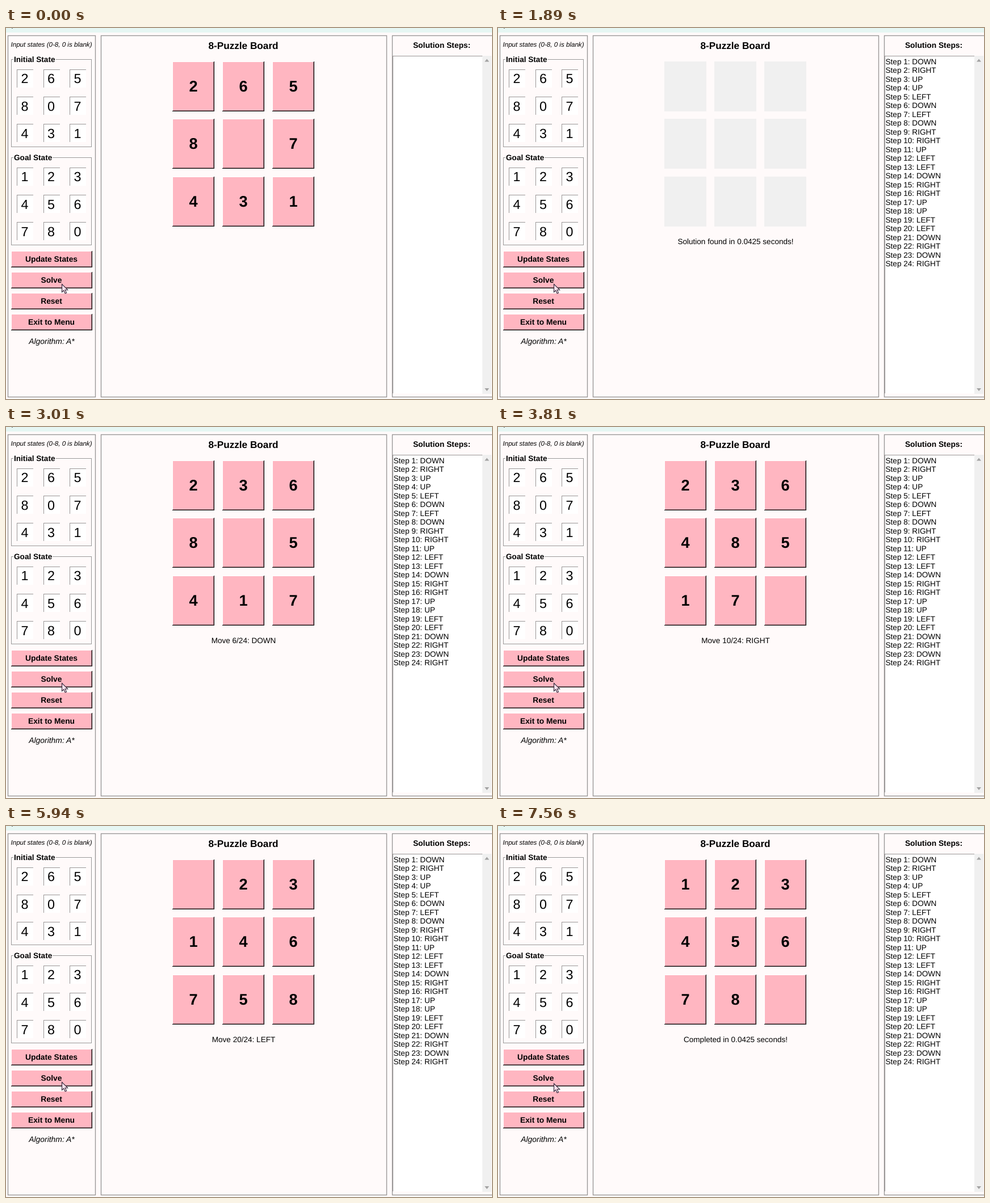
An HTML page with a canvas for the animation above (9870 ms loop, 856x654 px).

```html
<!DOCTYPE html>
<html lang="en">
<head>
<meta charset="utf-8">
<title>8-Puzzle Board</title>
<style>
  html, body { margin: 0; width: 100%; height: 100%; overflow: hidden; background: #fffafa; }
  canvas { display: block; }
</style>
</head>
<body>
<canvas id="stage" width="856" height="654"></canvas>
<script>
const ctx = document.getElementById('stage').getContext('2d');
const FAMILY = '"Liberation Sans", Arial, sans-serif';
const LOOP = 9870;
const SNOW = '#fffafa', PINK = '#ffb6c1', FACE = '#f0f0f0', GREY = '#999696';

const PRESS = 590, RELEASE = 790, SOLVED = 890, CLEARED = 1890, DONE = 7060, CURSOR_MOVED = 7560;
const MOVE_TIMES = [
  1990, 2190, 2390, 2600, 2800, 3010, 3210, 3410, 3610, 3810, 4020, 4220,
  4430, 4730, 4930, 5130, 5330, 5540, 5740, 5940, 6140, 6340, 6540, 6750
];
const MOVES = [...'DRUULDLDRRULLDRRUULLDRDR'];
const NAMES = { D: 'DOWN', R: 'RIGHT', U: 'UP', L: 'LEFT' };
const SHIFT = { D: 3, R: 1, U: -3, L: -1 };
const START = '265807431', GOAL = '123456780';

// Fractional letter advances keep the text widths true to the font size.
ctx.textRendering = 'geometricPrecision';

// Board after every move, beginning with the start state.
const boards = [[...START]];
for (const move of MOVES) {
  const next = [...boards[boards.length - 1]];
  const blank = next.indexOf('0');
  const other = blank + SHIFT[move];
  [next[blank], next[other]] = [next[other], next[blank]];
  boards.push(next);
}

function box(x, y, w, h, color) {
  ctx.fillStyle = color;
  ctx.fillRect(x, y, w, h);
}

function text(str, x, y, size, style = '', align = 'center') {
  ctx.font = `${style} ${size}px ${FAMILY}`;
  ctx.textAlign = align;
  ctx.fillStyle = '#000';
  ctx.fillText(str, x, y);
}

function outline(x, y, w, h, color, width = 1) {
  ctx.strokeStyle = color;
  ctx.lineWidth = width;
  ctx.strokeRect(x + 0.5, y + 0.5, w - 1, h - 1);
}

function groove(x, y, w, h, width) {
  outline(x + 1, y + 1, w, h, '#fff');
  outline(x, y, w, h, GREY, width);
}

function raised(x, y, w, h) {
  box(x, y, w, h, '#000');
  box(x, y, w - 1, h - 1, '#fff');
  box(x + 1, y + 1, w - 2, h - 2, '#a0727a');
  box(x + 1, y + 1, w - 3, h - 3, PINK);
}

function sunken(x, y, w, h, color) {
  box(x, y, w, h, GREY);
  box(x + 1, y + 1, w - 1, h - 1, color);
}

function stateGrid(title, top, state) {
  groove(9, top, 142, 155);
  ctx.font = `bold 13.6px ${FAMILY}`;
  box(13, top - 6, ctx.measureText(title).width + 2, 14, SNOW);
  text(title, 14, top + 5.3, 13.6, 'bold', 'left');
  [...state].forEach((digit, i) => {
    const cx = 33 + (i % 3) * 46.5;
    const cy = top + 34 + Math.floor(i / 3) * 48.2;
    sunken(Math.round(cx - 14), Math.round(cy - 16), 29, 32, '#fff');
    text(digit, cx, cy + 8.4, 23.3);
  });
}

function button(label, y, pressed) {
  if (pressed) sunken(9, y, 143, 29, FACE);
  else raised(9, y, 143, 29);
  const nudge = pressed ? 1 : 0;
  text(label, 80 + nudge, y + 19 + nudge, 13.8, 'bold');
}

function triangle(x, y, dir) {
  ctx.beginPath();
  ctx.moveTo(x - 4, y + 2.5 * dir);
  ctx.lineTo(x + 4, y + 2.5 * dir);
  ctx.lineTo(x, y - 2.5 * dir);
  ctx.fillStyle = '#a3a3a3';
  ctx.fill();
}

function cursor(x, y) {
  const points = [[0, 0], [0, 14], [3.2, 11.2], [5.6, 16.4], [8, 15.4], [5.7, 10.2], [10.2, 10.2]];
  ctx.beginPath();
  points.forEach(([dx, dy]) => ctx.lineTo(x + dx, y + dy));
  ctx.closePath();
  ctx.fillStyle = '#fbe0ea';
  ctx.fill();
  ctx.strokeStyle = '#2a2035';
  ctx.lineWidth = 1.1;
  ctx.stroke();
}

function controls(t) {
  groove(3, 13, 155, 638, 1.4);
  text('Input states (0-8, 0 is blank)', 80, 33, 11.6, 'italic');
  stateGrid('Initial State', 55, START);
  stateGrid('Goal State', 228, GOAL);
  button('Update States', 393);
  button('Solve', 430, t >= PRESS && t < RELEASE);
  button('Reset', 467);
  button('Exit to Menu', 504);
  text('Algorithm: A*', 80.5, 557, 13.9, 'italic');
}

function status(t, count) {
  if (t < SOLVED) return '';
  if (t >= DONE) return 'Completed in 0.0425 seconds!';
  if (!count) return 'Solution found in 0.0425 seconds!';
  return `Move ${count}/${MOVES.length}: ${NAMES[MOVES[count - 1]]}`;
}

function board(t) {
  groove(167, 13, 504, 638, 1.4);
  text('8-Puzzle Board', 418, 37, 17.2, 'bold');
  const count = MOVE_TIMES.filter(time => t >= time).length;
  const cleared = t >= CLEARED && !count;
  boards[count].forEach((digit, i) => {
    const x = 293 + (i % 3) * 88;
    const y = 59 + Math.floor(Math.floor(i / 3) * 101.5);
    if (cleared) return box(x, y, 74, 88, FACE);
    raised(x, y, 74, 88);
    if (digit !== '0') text(digit, x + 37, y + 53, 27.2, 'bold');
  });
  text(status(t, count), 418.5, 381, 13.55);
}

function steps(t) {
  groove(680, 13, 180, 638, 1.4);
  text('Solution Steps:', 767.5, 34.6, 13.8, 'bold');
  sunken(681, 49, 159, 595, '#fff');
  box(839, 49, 16, 596, FACE);
  triangle(847, 57, 1);
  triangle(847, 637.5, -1);
  if (t < SOLVED) return;
  MOVES.forEach((move, i) => {
    text(`Step ${i + 1}: ${NAMES[move]}`, 682.5, 63.8 + i * 15.5, 13.6, '', 'left');
  });
}

function draw(t) {
  box(0, 0, 856, 654, SNOW);
  box(0, 0, 856, 8, '#e6f6f3');
  box(10, 0, 2, 1, '#6f7a78');
  controls(t);
  board(t);
  steps(t);
  cursor(98.5, t < CURSOR_MOVED ? 451.5 : 454);
}

const began = performance.now();
function tick() {
  draw((performance.now() - began) % LOOP);
  requestAnimationFrame(tick);
}
tick();
</script>
</body>
</html>
```
